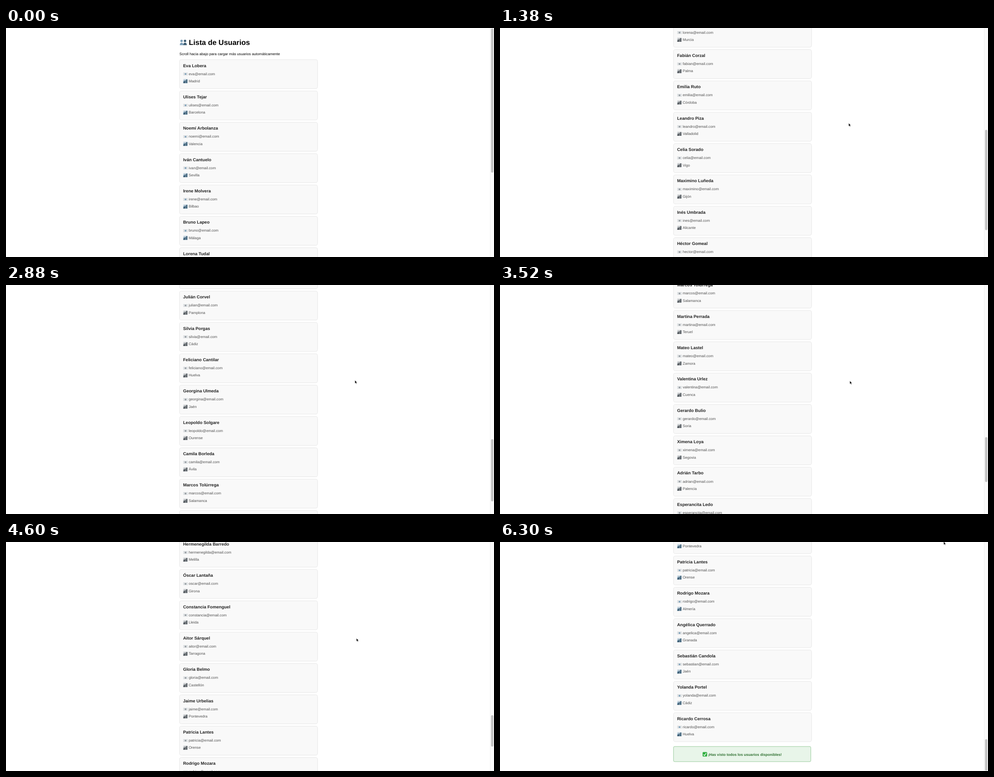
Write an HTML page that moves like this. It is 1089 px wide and 514 px high and loops after 6.46 s.

```html
<!DOCTYPE html>
<html lang="es">
<head>
<meta charset="utf-8">
<title>Lista de Usuarios</title>
<style>
  html, body { margin: 0; width: 100%; height: 100%; overflow: hidden; background: #fff; }
  svg { display: block; }
  text { font-family: "Liberation Sans", Arial, sans-serif; font-size: 8.19px; text-rendering: geometricPrecision; }
  .title { font-size: 16.38px; font-weight: bold; }
  .name { font-size: 9.58px; font-weight: bold; fill: #222; }
  .detail { fill: #505050; }
  .card { fill: #f9f9f9; stroke: #ddd; stroke-width: .7; }
  .done { fill: #e8f5e9; stroke: #7dbb80; stroke-width: .8; }
  .done-text { font-weight: bold; fill: #2e7030; }
  .ink { fill: hsl(205 var(--saturation) 35%); }
  .mid { fill: hsl(205 var(--saturation) 60%); }
  .pale { fill: hsl(205 var(--saturation) 83%); }
</style>
</head>
<body>
<svg id="stage" width="1089" height="514" viewBox="0 0 1089 514">
  <defs>
    <g id="mail">
      <rect width="10" height="6.4" rx=".6" fill="#dfe2e4"/>
      <path d="M.3 .5L5 3.6L9.7 .5M.3 6L3.7 3M9.7 6L6.3 3" fill="none" stroke="#c4c9cd" stroke-width=".5"/>
      <rect class="mid" x="3.5" y="1.5" width="3" height="3.6" rx=".6"/>
    </g>
    <g id="city">
      <rect class="pale" width="9.6" height="9.2" rx=".6"/>
      <path class="mid" d="M0 3.5H2.2V9.2H0ZM5 4H7V9.2H5Z"/>
      <path class="ink" d="M1.6 5H3.2V2.6H5V9.2H0V6.5H1.6ZM6.3 1H9V9.2H6.3Z"/>
    </g>
    <g id="person">
      <circle cx="4" cy="3.4" r="2.7"/>
      <path d="M0 13Q0 7.4 4 7.4Q8 7.4 8 13Z"/>
    </g>
  </defs>
  <g id="page"></g>
  <rect x="1080.5" width="8.5" height="514" fill="#fafafa"/>
  <path d="M1080.5 0V514" stroke="#e8e8e8" stroke-width=".7"/>
  <rect id="thumb" x="1082.4" width="5.2" rx="2.6" fill="#c1c1c1"/>
  <path id="cursor" d="M0 0V7.2L1.7 5.7L2.9 8.3L4.1 7.8L3 5.3H5.2Z" stroke="#fff" stroke-width=".6"/>
</svg>
<script>
const LOOP = 6460, VIEW = 514, STEP = 80, BATCH = 5;
const LEFT = 387.2, FIRST_CARD = 71, PITCH = 70.35;

const users = `Eva Lobera|Madrid
Ulises Tejar|Barcelona
Noemí Arbolanza|Valencia
Iván Cantuelo|Sevilla
Irene Molvera|Bilbao
Bruno Lapeo|Málaga
Lorena Tudal|Murcia
Fabián Corzal|Palma
Emilia Ruto|Córdoba
Leandro Piza|Valladolid
Celia Sorado|Vigo
Maximino Luñeda|Gijón
Inés Umbrada|Alicante
Héctor Gomeal|Santander
Leticia Varmona|Toledo
Simón Barrosa|Badajoz
Maximiliana Lomena|Logroño
Julián Corvel|Pamplona
Silvia Porgas|Cádiz
Feliciano Cantilar|Huelva
Georgina Ulmeda|Jaén
Leopoldo Solgare|Ourense
Camila Borleda|Ávila
Marcos Tolúrrega|Salamanca
Martina Perrada|Teruel
Mateo Lastel|Zamora
Valentina Urlez|Cuenca
Gerardo Bulio|Soria
Ximena Loya|Segovia
Adrián Tarbo|Palencia
Esperancita Ledo|Lugo
Nicolás Brazal|León
Rosalía Cendero|Burgos
Gustavo Pelmar|Huesca
Beatriz Ondara|Cáceres
Lorenzo Tacuña|Albacete
Amalia Dorvera|Guadalajara
Claudio Ferzal|Ceuta
Hermenegilda Barredo|Melilla
Óscar Lantaña|Girona
Constancia Fomenguel|Lleida
Aitor Sárquel|Tarragona
Gloria Belmo|Castellón
Jaime Urbelias|Pontevedra
Patricia Lantes|Orense
Rodrigo Mozara|Almería
Angélica Querrado|Granada
Sebastián Candola|Jaén
Yolanda Portel|Cádiz
Ricardo Cerrosa|Huelva`.split('\n').map(line => line.split('|'));

// Wheel flicks: start, end, scroll position reached
const flicks = [
  [360, 1000, 290], [1100, 1380, 515], [1580, 2080, 878.4], [2220, 2700, 1219],
  [2860, 3280, 1681], [3520, 4200, 2300], [4420, 4600, 2753], [4740, 4880, 3135]
];

const byId = id => document.getElementById(id);
const show = (element, visible) => { element.style.display = visible ? '' : 'none'; };
const plain = text => text.normalize('NFD').replace(/[\u0300-\u036f]/g, '').toLowerCase();
const mix = (a, b, p) => a + (b - a) * p;

// Eased progress from 0 to 1, advancing in visible steps
function progress(t, start, end) {
  if (t < start) return 0;
  const steps = Math.floor((end - start) / STEP) + 1;
  const p = Math.min(1, (Math.floor((t - start) / STEP) + 1) / steps);
  return p * p * (3 - 2 * p);
}

const scrollAt = t => flicks.reduce((y, [start, end, target]) => mix(y, target, progress(t, start, end)), 0);

// A new batch arrives whenever the view passes the last card
function loadedAt(scroll) {
  const needed = (scroll + VIEW - FIRST_CARD) / PITCH;
  return Math.min(users.length, Math.ceil(needed / BATCH) * BATCH);
}

function card([name, city], i) {
  return `<g class="user" transform="translate(${LEFT} ${FIRST_CARD + i * PITCH})">
    <rect class="card" width="308" height="65" rx="4.1"/>
    <text class="name" x="8" y="16.5">${name}</text>
    <use href="#mail" x="8.4" y="29"/>
    <text class="detail" x="20.5" y="34.6">${plain(name.split(' ')[0])}@email.com</text>
    <use href="#city" x="8.5" y="43.6"/>
    <text class="detail" x="20.5" y="51">${city}</text>
  </g>`;
}

byId('page').innerHTML = `
  <use href="#person" class="mid" x="387.8" y="25.5"/>
  <use href="#person" class="ink" x="395.5" y="25.5"/>
  <text class="title" x="408" y="37.5">Lista de Usuarios</text>
  <text x="387" y="61.3">Scroll hacia abajo para cargar más usuarios automáticamente</text>
  ${users.map(card).join('')}
  <g id="done" transform="translate(${LEFT} 3594)">
    <rect class="done" width="306.4" height="34" rx="2.6"/>
    <rect x="65" y="12.6" width="10" height="10" rx="1.6" fill="#2fae3f"/>
    <path d="M67 18L69.2 20.4L73 14.6" fill="none" stroke="#fff" stroke-width="1.5"/>
    <text class="done-text" x="77.2" y="20.5">¡Has visto todos los usuarios disponibles!</text>
  </g>`;

const cards = [...document.querySelectorAll('.user')];

function draw(now) {
  const t = now % LOOP;
  const scroll = scrollAt(t);
  const count = loadedAt(scroll);
  const finished = count === users.length;
  const height = FIRST_CARD + PITCH * count + (finished ? 60.5 : 37);

  cards.forEach((element, i) => show(element, i < count));
  show(byId('done'), finished);
  byId('page').setAttribute('transform', `translate(0 ${-scroll})`);
  byId('thumb').setAttribute('y', scroll / height * VIEW + 1);
  byId('thumb').setAttribute('height', VIEW * VIEW / height - 2);

  const drift = progress(t, 2500, 4200), leave = progress(t, 5600, 6200);
  const x = mix(778 + 4 * drift, 990, leave);
  const y = mix(213.5 + 2.5 * drift, -1, leave);
  byId('cursor').setAttribute('transform', `translate(${x} ${y})`);
  show(byId('cursor'), t >= flicks[0][0]);

  const vivid = t < 120 || t >= 5180;
  byId('stage').style.setProperty('--saturation', vivid ? '30%' : '6%');
  requestAnimationFrame(draw);
}
draw(0);
</script>
</body>
</html>
```
